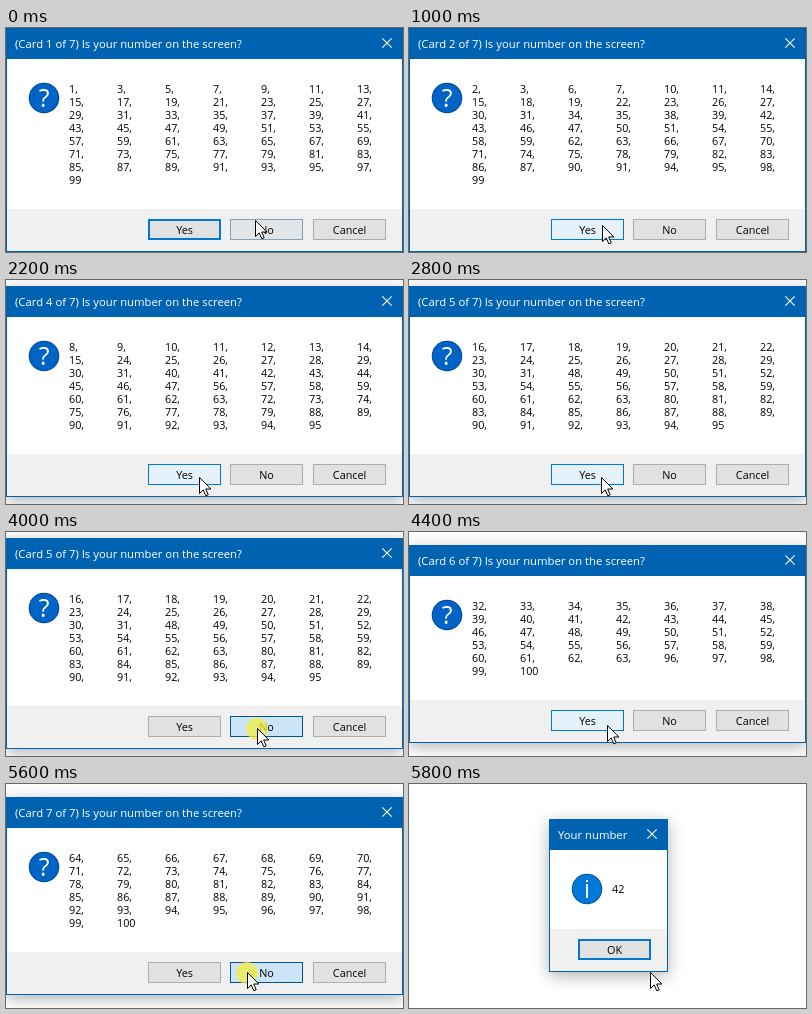
An HTML page with a canvas for the animation above (7400 ms loop, 397 px wide and 224 px high).

```html
<!DOCTYPE html>
<html lang="en">
<head>
<meta charset="utf-8">
<title>Guess the number</title>
<style>
html, body { margin: 0; width: 100%; height: 100%; overflow: hidden; background: #fff; }
canvas { display: block; }
</style>
</head>
<body>
<canvas id="stage" width="397" height="224"></canvas>
<script>
const ctx = document.getElementById('stage').getContext('2d');
const LOOP = 7400, RESULT = 8, BLUE = '#0063b1', ACCENT = '#0078d7';
const FAMILY = '"Open Sans", "Noto Sans", sans-serif';
const BODY = '500 10.8px ' + FAMILY;
const TITLE = '500 11.3px ' + FAMILY;
const MARK = '500 25px ' + FAMILY;

// start time, card, cursor x, cursor y, mouse state
const steps = [
  [0, 1, 250, 193, 'enter'], [200, 1, 252, 198, 'hover'], [600, 1, 252, 198, 'press'],
  [800, 2, 220, 199, 'hover'], [1000, 2, 194, 198, 'hover'], [1200, 2, 194, 198, 'press'],
  [1400, 3, 222, 200, 'hover'], [1600, 3, 260, 201, 'hover'], [1800, 3, 260, 201, 'press'],
  [2000, 4, 222, 200, 'hover'], [2200, 4, 194, 198, 'hover'], [2400, 4, 194, 198, 'press'],
  [2600, 5, 194, 198, 'hover'], [2800, 5, 193, 198, 'hover'],
  [3000, 5, 205, 198, 'hover'], [3200, 5, 234, 198, 'hover'], [3400, 5, 252, 197, 'hover'],
  [4000, 5, 252, 197, 'press'],
  [4200, 6, 222, 195, 'hover'], [4400, 6, 199, 194, 'hover'], [4800, 6, 199, 194, 'press'],
  [5000, 7, 199, 194, 'hover'], [5200, 7, 222, 191, 'hover'], [5400, 7, 242, 189, 'hover'],
  [5600, 7, 242, 189, 'press'], [5800, RESULT, 242, 189, 'hover']
];

// fill, edge, edge width
const looks = {
  plain: ['#e1e1e1', '#adadad', 1],
  focus: ['#e1e1e1', ACCENT, 2],
  enter: ['#e2e6e9', '#82a0b8', 1],
  hover: ['#e5f1fb', ACCENT, 1],
  press: ['#cce4f7', '#005499', 1]
};

function rect(color, x, y, w, h) {
  ctx.fillStyle = color;
  ctx.fillRect(x, y, w, h);
}

function text(str, x, y, color = '#000', align = 'left', font = BODY) {
  ctx.fillStyle = color;
  ctx.textAlign = align;
  ctx.font = font;
  ctx.fillText(str, x, y);
}

function disc(color, x, y, r) {
  ctx.fillStyle = color;
  ctx.beginPath();
  ctx.arc(x, y, r, 0, 2 * Math.PI);
  ctx.fill();
}

function drawFrame(x, y, w, h, title) {
  ctx.save();
  ctx.shadowColor = 'rgba(0,0,0,.3)';
  ctx.shadowBlur = 15;
  ctx.shadowOffsetY = 4;
  rect(BLUE, x, y, w, h);
  ctx.restore();
  rect('#fff', x + 1, y + 31, w - 2, h - 74);
  rect('#f0f0f0', x + 1, y + h - 43, w - 2, 42);
  text(title, x + 9, y + 20, '#fff', 'left', TITLE);
  const cx = x + w - 16, cy = y + 15;
  ctx.strokeStyle = '#fff';
  ctx.lineWidth = 1.1;
  ctx.beginPath();
  for (const s of [-1, 1]) {
    ctx.moveTo(cx - 4.7, cy - 4.7 * s);
    ctx.lineTo(cx + 4.7, cy + 4.7 * s);
  }
  ctx.stroke();
}

function drawButton(label, x, y, look) {
  const [fill, edge, line] = looks[look];
  rect(edge, x, y, 73, 21);
  rect(fill, x + line, y + line, 73 - 2 * line, 21 - 2 * line);
  text(label, x + 36.5, y + 15, '#000', 'center');
}

function drawCard(n, mx, my, state) {
  const bit = 1 << (n - 1), list = [];
  for (let i = 1; i <= 100; i++) if (i & bit) list.push(i);
  const rows = Math.ceil(list.length / 7);
  const wide = n === 3;
  const x = wide ? -1 : 0, w = wide ? 400 : 397;
  const y = [13, 6, 0][rows - 6], h = 120 + 13 * rows;

  drawFrame(x, y, w, h, `(Card ${n} of 7) Is your number on the screen?`);
  disc('#00489a', x + 38, y + 70, 15.3);
  disc('#0063c6', x + 38, y + 70, 14.3);
  text('?', x + 38, y + 79, '#fff', 'center', MARK);
  list.forEach((v, i) => text(
    v + (i < list.length - 1 ? ',' : ''),
    x + 63 + 48 * (i % 7), y + 65 + 13 * Math.floor(i / 7)));

  const by = y + h - 33;
  ['Yes', 'No', 'Cancel'].forEach((label, i) => {
    const bx = x + w - [255, 173, 90][i];
    const over = mx >= bx && mx < bx + 73 && my >= by && my < by + 21;
    const rest = i === 0 && state !== 'press' ? 'focus' : 'plain';
    drawButton(label, bx, by, over ? state : rest);
  });
}

function drawResult() {
  drawFrame(140, 35, 119, 153, 'Your number');
  disc('#005a9e', 178, 105, 15.3);
  disc(ACCENT, 178, 105, 14.3);
  rect('#fff', 177, 96, 2, 2);
  rect('#fff', 177, 100, 2, 14);
  text('42', 203, 109);
  drawButton('OK', 169, 155, 'focus');
}

function drawCursor(x, y, pressed) {
  if (pressed) disc('rgba(244,236,60,.75)', x - 1, y, 11);
  ctx.save();
  ctx.translate(x - .5, y - .5);
  const arrow = new Path2D('M0 0V16L3.7 12.4L6.3 18.3L8.7 17.3L6.2 11.5H11.4Z');
  ctx.fillStyle = '#fff';
  ctx.fill(arrow);
  ctx.strokeStyle = '#000';
  ctx.lineWidth = 1;
  ctx.stroke(arrow);
  ctx.restore();
}

function draw(now) {
  const t = now % LOOP;
  const [, card, mx, my, state] = steps.findLast(s => s[0] <= t) || steps[0];
  rect('#fff', 0, 0, 397, 224);
  if (card === RESULT) drawResult();
  else drawCard(card, mx, my, state);
  drawCursor(mx, my, state === 'press');
}

const start = performance.now();
function tick() {
  draw(performance.now() - start);
  requestAnimationFrame(tick);
}
tick();
</script>
</body>
</html>
```
